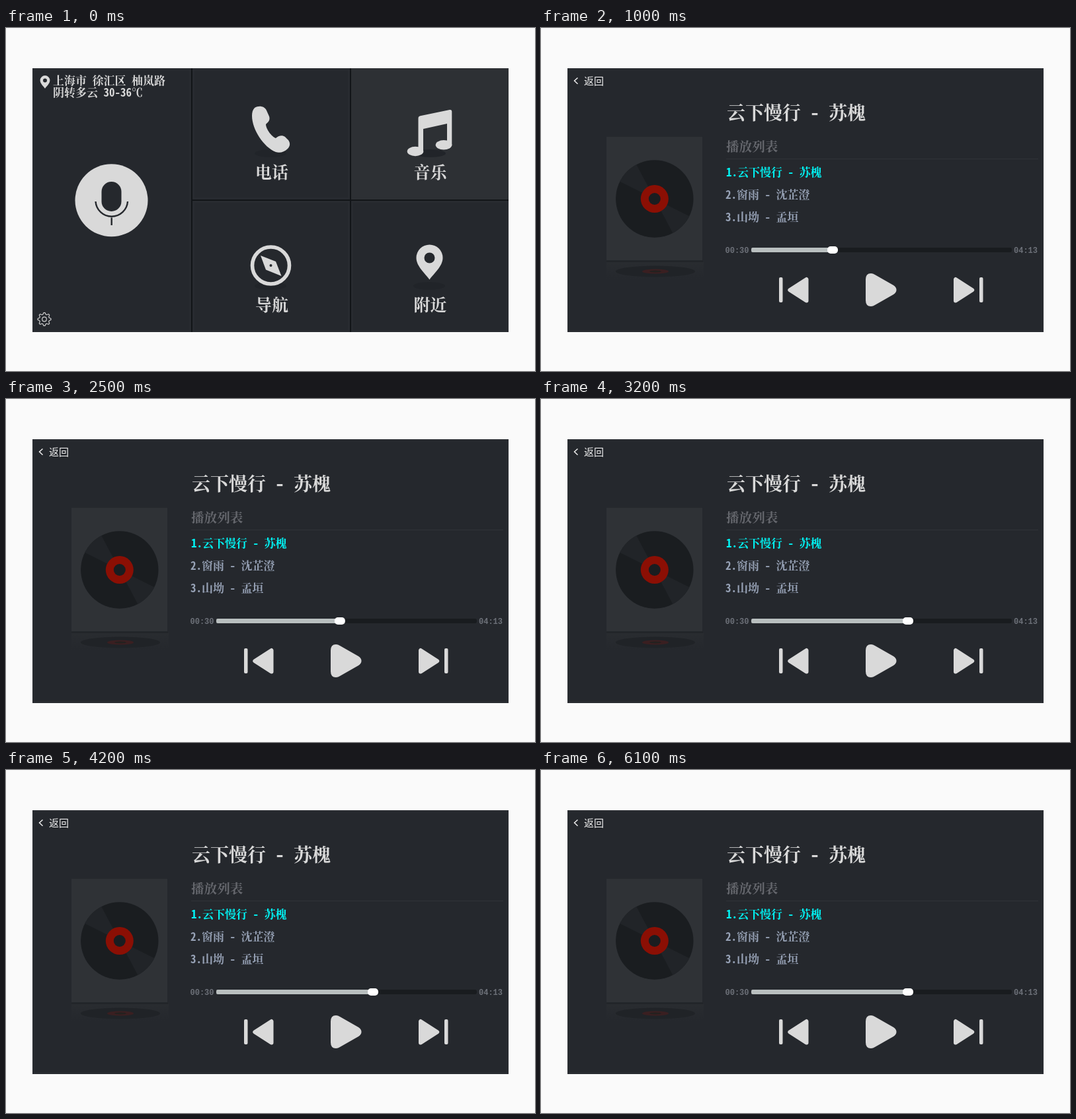
An HTML page that plays this animation: 800 px wide and 520 px high, repeating every 6200 ms.

```html
<!DOCTYPE html>
<html lang="zh-CN">
<head>
<meta charset="utf-8">
<title>车载音乐</title>
<style>
  html, body { margin: 0; width: 100%; height: 100%; overflow: hidden; background: #fafafa; }
  svg { display: block; }
  text { font-family: "Noto Serif CJK SC", "Noto Sans CJK SC", "Noto Sans CJK", serif; font-size: 17px; font-weight: 600; white-space: pre; }
  .half { font-family: "Noto Sans Mono CJK SC", "Noto Sans CJK SC", monospace; }
  .label { font-size: 25px; text-anchor: middle; }
  .clock { font: bold 12px "Liberation Mono", monospace; fill: #6c7078; }
  .tile { fill: #25282d; }
  .edge { fill: none; stroke: #282b30; stroke-width: 3; }
  .icon { fill: #d9d9d9; }
  .round { stroke: #d9d9d9; stroke-width: 6; stroke-linejoin: round; }
  .line { fill: none; stroke: #25282d; stroke-width: 2.4; }
  .shade { fill: #212429; }
</style>
</head>
<body>
<svg width="800" height="520" viewBox="0 0 800 520">
  <defs>
    <linearGradient id="mirror" x2="0" y2="1">
      <stop stop-color="#292c30"/>
      <stop offset="1" stop-color="#25282d"/>
    </linearGradient>
    <path id="pin" fill-rule="evenodd" d="M0 33C-6 24-20 13-20 0A20 20 0 0 1 20 0C20 13 6 24 0 33ZM8 0A8 8 0 1 0-8 0A8 8 0 1 0 8 0Z"/>
    <g id="skip">
      <rect x="360" y="378" width="5.5" height="38" rx="2"/>
      <path class="round" d="M401.5 381V413.5L376.3 397.2Z"/>
    </g>
  </defs>

  <g id="home">
    <rect x="40" y="61" width="720" height="400" fill="#121518"/>
    <g id="tiles"></g>

    <g class="icon">
      <use href="#pin" transform="translate(59 79.5) scale(.37)"/>
      <text x="71" y="86">上海市 徐汇区 柚岚路</text>
      <text x="71" y="104">阴转多云 30-36℃</text>

      <circle cx="159.5" cy="261.3" r="55"/>
      <rect x="144.5" y="233" width="30" height="45" rx="15" fill="#25282d"/>
      <path class="line" d="M135.5 263A24.3 24.3 0 0 0 184 263M159.7 287.5V299"/>
      <path id="gear" fill="none" stroke="#d0d0d0" stroke-width="1.2" stroke-linejoin="round"/>
      <circle cx="58" cy="441.5" r="3.3" fill="none" stroke="#d0d0d0" stroke-width="1.2"/>

      <ellipse class="shade" cx="400" cy="190" rx="24" ry="6"/>
      <path d="M376 121C382 117 391 118 394 125L398 134C400 140 396 143 393 146C393 153 402 165 408 167C412 163 418 162 422 165L427 170C430 174 430 179 426 183C421 188 414 190 408 188C390 181 372 154 372 133C372 128 373 124 376 121Z"/>

      <ellipse class="shade" cx="642" cy="190" rx="23" ry="6"/>
      <path d="M623.5 137Q623.5 134 626.5 133.3L671 124Q674.3 123.5 674.3 127V178H667V145L631 153V188H623.5Z"/>
      <ellipse cx="619" cy="187" rx="12.3" ry="7.2"/>
      <ellipse cx="662" cy="177.3" rx="12.3" ry="7.2"/>

      <ellipse class="shade" cx="400" cy="391" rx="24" ry="6"/>
      <circle cx="400.5" cy="360" r="28" fill="none" stroke="#d9d9d9" stroke-width="5.6"/>
      <path d="M385 345L408 354L416.5 376L393 366.5Z"/>
      <circle cx="400.5" cy="360" r="2" fill="#25282d"/>

      <ellipse class="shade" cx="640" cy="391" rx="24" ry="6"/>
      <use href="#pin" x="640.5" y="348.5"/>

      <text class="label" x="402" y="228">电话</text>
      <text class="label" x="641.5" y="228">音乐</text>
      <text class="label" x="402" y="429">导航</text>
      <text class="label" x="641.5" y="429">附近</text>
    </g>
  </g>

  <g id="player">
    <rect class="tile" x="40" y="61" width="720" height="400"/>
    <rect class="edge" x="41.5" y="62.5" width="717" height="397"/>
    <path d="M55.5 75.5L50.5 80L55.5 84.8" fill="none" stroke="#eee" stroke-width="1.5"/>
    <text class="half" x="65" y="85.5" fill="#eee" style="font-size:15px;font-weight:500">返回</text>

    <rect x="99" y="165" width="145" height="187.5" fill="#2f3236"/>
    <path d="M99 353.5H245" stroke="#212428" stroke-width="2"/>
    <rect x="99" y="355" width="147" height="25" fill="url(#mirror)"/>
    <ellipse cx="173" cy="369" rx="60" ry="8.5" fill="#202327"/>
    <ellipse cx="173" cy="369" rx="20" ry="3.6" fill="#3a1f21"/>
    <ellipse cx="173" cy="369" rx="9" ry="1.5" fill="#24211f"/>
    <g transform="translate(171.8 259)">
      <circle r="58.7" fill="#1a1d20"/>
      <path d="M0 0L-52.5-26.3A58.7 58.7 0 0 1-27.5-51.9ZM0 0L52.5 26.3A58.7 58.7 0 0 1 27.5 51.9Z" fill="#212428"/>
      <circle r="21" fill="#8b0f04"/>
      <circle r="9" fill="#1a1d20"/>
    </g>

    <text x="281" y="138.5" fill="#d9d9d9" style="font-size:28px">云下慢行 - 苏槐</text>
    <text x="280" y="186.5" fill="#65676d" style="font-size:19.6px">播放列表</text>
    <path d="M280 198.5H752" stroke="#303338"/>
    <text x="280" y="224.5" fill="#00f8f8">1.云下慢行 - 苏槐</text>
    <text x="279" y="258.5" fill="#97a2b6">2.窗雨 - 沈芷澄</text>
    <text x="279" y="292.5" fill="#97a2b6">3.山坳 - 孟垣</text>

    <text class="clock" x="278.5" y="341">00:30</text>
    <text class="clock" x="715" y="341">04:13</text>
    <rect x="318" y="333" width="394" height="7" rx="3" fill="#191c1f"/>
    <rect id="bar" x="318" y="333" width="123" height="7" rx="2" fill="#b9bfbf"/>
    <rect id="knob" x="433" y="331" width="16" height="11" rx="5" fill="#fff"/>

    <g class="icon">
      <use href="#skip"/>
      <use href="#skip" transform="matrix(-1 0 0 1 1028.5 0)"/>
      <path id="play" d="M491 381Q491 372 499 372Q502 372 505 374L533 390Q537.5 393 537.5 397Q537.5 401 533 404L505 420Q502 422 499 422Q491 422 491 413Z"/>
    </g>
  </g>
</svg>
<script>
  const LOOP = 6200, STEP = 100;
  const $ = id => document.getElementById(id);

  // Latin characters and spaces take half the width of a Chinese one.
  for (const text of document.querySelectorAll('text:not(.clock)'))
    text.innerHTML = text.textContent.replace(/[ -~]+/g, '<tspan class="half">$&</tspan>');

  // The music tile is the highlighted one.
  $('tiles').innerHTML = [
    [40, 61, 240, 400], [282, 61, 238, 199], [522, 61, 238, 199, '#2d3034'],
    [282, 262, 238, 199], [522, 262, 238, 199]
  ].map(([x, y, w, h, fill = '#25282d']) =>
    `<rect x="${x}" y="${y}" width="${w}" height="${h}" fill="${fill}"/>` +
    (fill === '#25282d' ? `<rect class="edge" x="${x + 1.5}" y="${y + 1.5}" width="${w - 3}" height="${h - 3}"/>` : '')
  ).join('');

  const TEETH = 8, points = [];
  for (let i = 0; i < TEETH * 4; i++) {
    const a = (i - 1.5) * Math.PI / (TEETH * 2) - Math.PI / 2;
    const r = i % 4 === 1 || i % 4 === 2 ? 10 : 7.6;
    points.push(`${(58 + r * Math.cos(a)).toFixed(2)} ${(441.5 + r * Math.sin(a)).toFixed(2)}`);
  }
  $('gear').setAttribute('d', `M${points.join('L')}Z`);

  // Each key is [time in ms, value]; the whole loop advances in 100 ms steps.
  function play(id, prop, keys) {
    const frames = keys.map(([time, value]) => ({ offset: time / LOOP, [prop]: value }));
    $(id).animate(frames, {
      duration: LOOP, iterations: Infinity, easing: `steps(${LOOP / STEP}, end)`
    });
  }

  const START = 1660, END = 3160;
  play('player', 'opacity', [[0, 0], [50, 0], [400, 1], [LOOP, 1]]);
  play('bar', 'width', [[0, '123px'], [START, '123px'], [END, '237px'], [LOOP, '237px']]);
  play('knob', 'transform', [
    [0, 'translateX(0px)'], [START, 'translateX(0px)'],
    [END, 'translateX(114px)'], [LOOP, 'translateX(114px)']
  ]);
  play('knob', 'fill', [[0, '#e6e8e8'], [750, '#e6e8e8'], [750, '#fff'], [LOOP, '#fff']]);
  play('play', 'fill', [
    [0, '#d9d9d9'], [1450, '#d9d9d9'], [1450, '#b9cce4'],
    [1750, '#b9cce4'], [1750, '#d9d9d9'], [LOOP, '#d9d9d9']
  ]);
</script>
</body>
</html>
```
